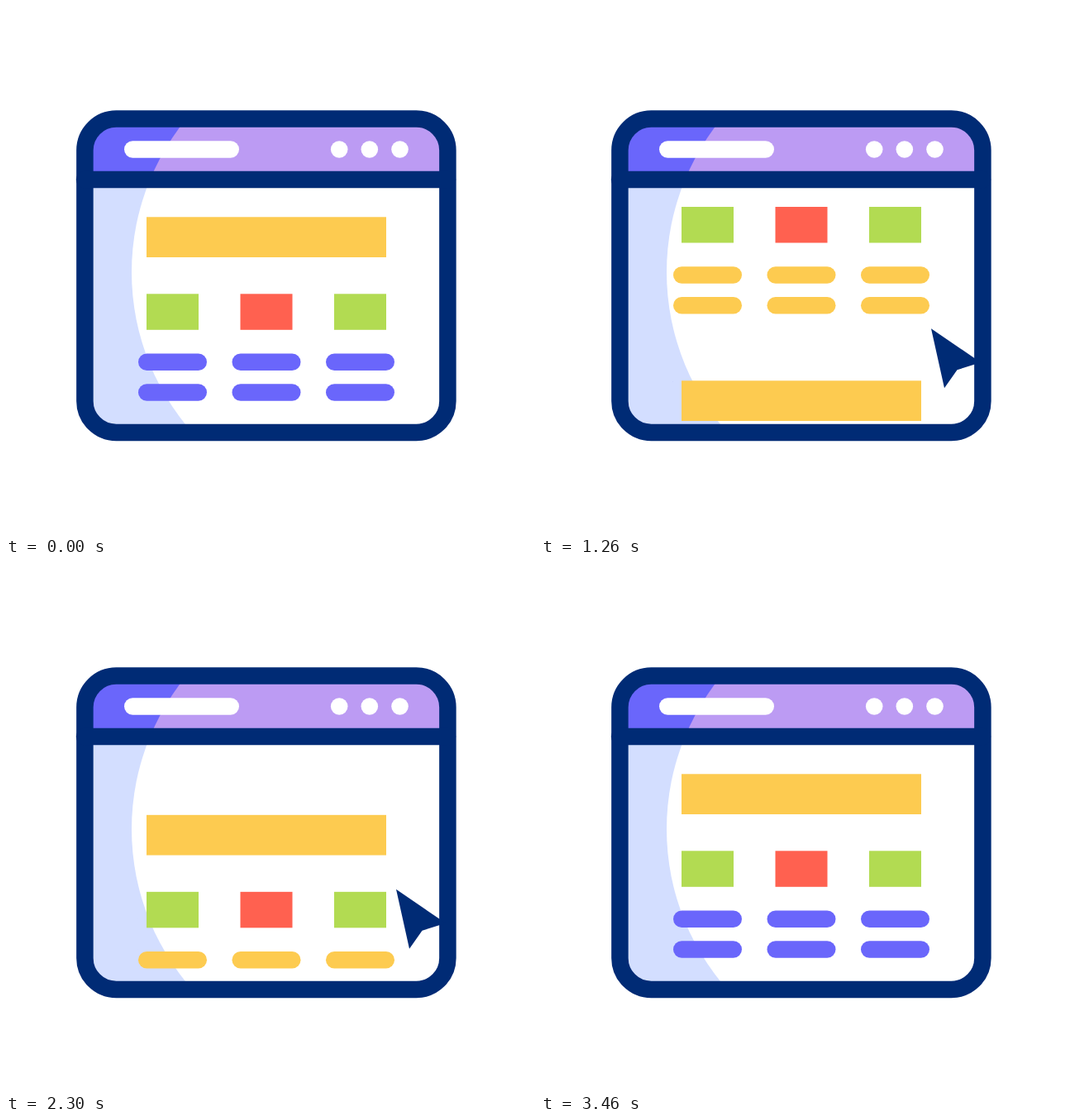
Animation of 640 by 640 pixels, one loop 3.54 s. Source, as an HTML page:

```html
<!DOCTYPE html>
<html lang="en">
<head>
<meta charset="utf-8">
<title>Scrolling browser window</title>
<style>
  html, body { margin: 0; width: 100%; height: 100%; overflow: hidden; background: #fff; }
  svg { display: block; width: 100vw; height: 100vh; }
</style>
</head>
<body>
<svg viewBox="0 0 640 640">
  <defs>
    <clipPath id="win"><rect x="95.5" y="136.5" width="439" height="379.5" rx="38"/></clipPath>
    <clipPath id="body"><rect x="95" y="210" width="440" height="306"/></clipPath>
    <clipPath id="head"><rect x="95" y="136" width="440" height="74"/></clipPath>
  </defs>
  <g clip-path="url(#win)">
    <g clip-path="url(#body)">
      <rect x="95" y="210" width="440" height="306" fill="#d3deff"/>
      <circle cx="445" cy="322" r="293" fill="#fff"/>
      <g id="strip"></g>
    </g>
    <g clip-path="url(#head)">
      <rect x="95" y="136" width="440" height="74" fill="#6a66fb"/>
      <circle cx="445" cy="322" r="293" fill="#bc9bf3"/>
    </g>
  </g>
  <g fill="#fff">
    <rect x="143" y="163.2" width="139" height="20.5" rx="10.25"/>
    <circle cx="403.2" cy="173.5" r="10.3"/>
    <circle cx="439.8" cy="173.5" r="10.3"/>
    <circle cx="476.5" cy="173.5" r="10.3"/>
  </g>
  <g fill="none" stroke="#002b75" stroke-width="20.5">
    <rect x="95.4" y="136.5" width="439" height="379.5" rx="38"/>
    <path d="M95 210H534" stroke-linecap="round"/>
  </g>
  <path id="cursor" d="M0 0L60 41L31.500 50L16 72Z" fill="#002b75"/>
</svg>
<script>
const LOOP = 3540, PAGE = 303.3, TOP = 255.3;
const YELLOW = '#fdcb50', PURPLE = '#6a66fb', GREEN = '#b2db52', RED = '#ff6150';
const strip = document.getElementById('strip');
const cursor = document.getElementById('cursor');

function box(x, y, width, height, fill, rx = 0) {
  const el = document.createElementNS('http://www.w3.org/2000/svg', 'rect');
  const attrs = { x, y, width, height, fill, rx };
  for (const name in attrs) el.setAttribute(name, attrs[name]);
  strip.append(el);
}

function page(y, pillColor) {
  box(170, y, 290, 48.7, YELLOW);
  [GREEN, RED, GREEN].forEach((color, i) => {
    const x = 170 + i * 113.5;
    box(x, y + 93, 63, 43.5, color);
    for (const dy of [165.2, 202]) box(x - 10, y + dy, 83, 20.5, pillColor, 10.25);
  });
}
page(TOP, PURPLE);
page(TOP - PAGE, YELLOW);

const smooth = u => u * u * (3 - 2 * u);

// Bezier timing with horizontal handles at a and b
function fling(u, a = 0.4, b = 0.164) {
  let lo = 0, hi = 1;
  for (let i = 0; i < 24; i++) {
    const s = (lo + hi) / 2, r = 1 - s;
    if (3 * r * r * s * a + 3 * r * s * s * b + s * s * s < u) lo = s; else hi = s;
  }
  return smooth(lo);
}

// time, cursor x, cursor y, scroll, easing towards this key
const keys = [
  [0, 648, 190, 0],
  [225, 648, 190, 0],
  [543, 472, 239, 0],
  [1093, 472, 437, 198],
  [1625, 472, 239, 198],
  [2160, 472, 395, 353.3],
  [2290, 472, 395, 353.3],
  [2740, 472, 239, 0, fling],
  [2825, 472, 239, 0],
  [3280, 652, 190, 0],
  [LOOP, 652, 190, 0]
];

function draw(t) {
  const i = keys.findIndex(k => k[0] > t);
  const from = keys[i - 1], to = keys[i];
  const p = (to[4] || smooth)((t - from[0]) / (to[0] - from[0]));
  const [, x, y, scroll] = from.map((v, n) => v + (to[n] - v) * p);
  cursor.setAttribute('transform', `translate(${x} ${y})`);
  strip.setAttribute('transform', `translate(0 ${scroll})`);
}

const start = performance.now();
function tick() {
  draw((performance.now() - start) % LOOP);
  requestAnimationFrame(tick);
}
draw(0);
requestAnimationFrame(tick);
</script>
</body>
</html>
```
